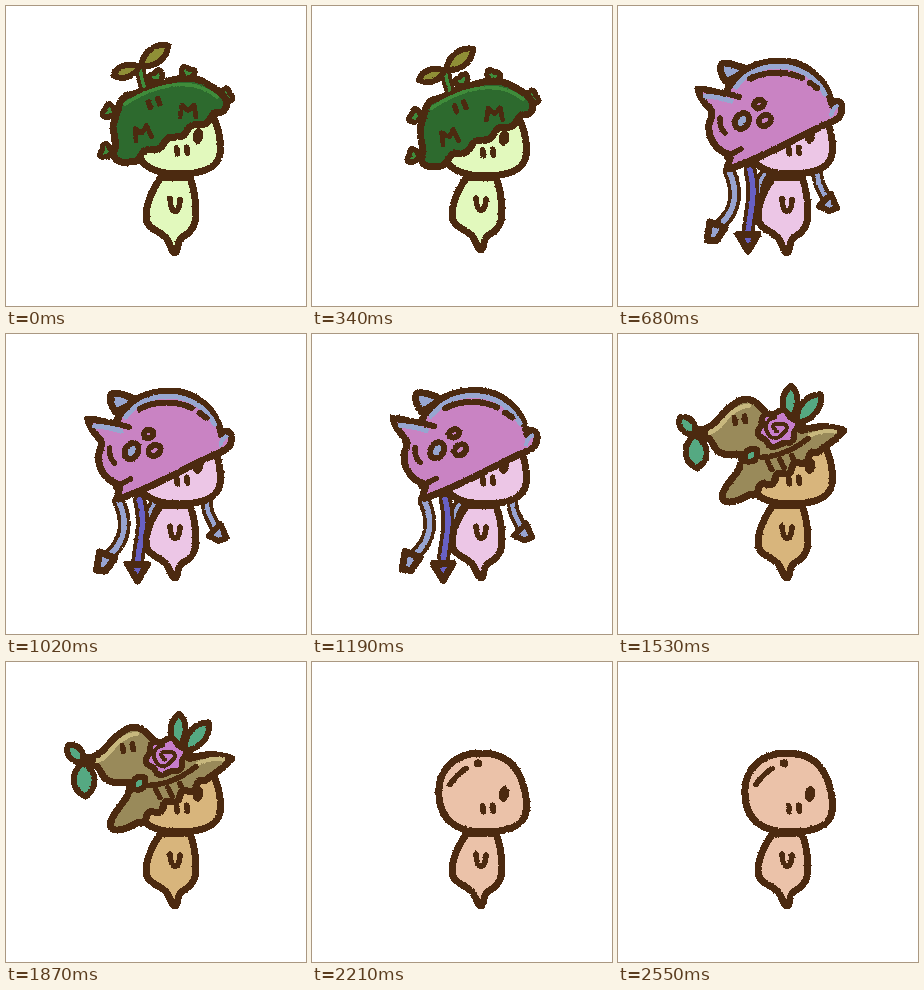
These frames come from a looping animation (300x300 px, 2720 ms). An HTML page:

```html
<!DOCTYPE html>
<html lang="en">
<head>
<meta charset="utf-8">
<title>Sprout hats</title>
<style>
html, body { margin: 0; width: 100%; height: 100%; overflow: hidden; background: #fff; }
svg { display: block; width: 100vw; height: 100vh; }
</style>
</head>
<body>
<svg viewBox="0 0 300 300" shape-rendering="crispEdges" stroke-linecap="round" stroke-linejoin="round">
  <filter id="rough" filterUnits="userSpaceOnUse" x="0" y="0" width="300" height="300" color-interpolation-filters="sRGB">
    <feTurbulence id="noise" type="fractalNoise" baseFrequency=".4" numOctaves="1" result="n"/>
    <feDisplacementMap in="SourceGraphic" in2="n" scale="2.4" xChannelSelector="R" yChannelSelector="G"/>
  </filter>
  <g id="stage" filter="url(#rough)"></g>
</svg>
<script>
const INK = '#4c2a10';
const STEP = 170, POSES = 4;

const group = (transform, ...parts) => `<g transform="${transform}">${parts.join('')}</g>`;
const path = (d, fill = 'none', w = 7, ink = INK) =>
  `<path d="${d}" fill="${fill}" stroke="${ink}" stroke-width="${w}"/>`;
const line = (d, w = 5.5, ink = INK) => path(d, 'none', w, ink);
const tube = (d, fill, w = 12) => line(d, w) + line(d, w - 7.5, fill);
const spot = (x, y, rx, ry, turn, fill = INK, w = 0) =>
  group(`translate(${x} ${y}) rotate(${turn})`,
    `<ellipse rx="${rx}" ry="${ry}" fill="${fill}" stroke="${INK}" stroke-width="${w}"/>`);

// Two short strokes side by side.
const pair = (x, y, turn = 0) =>
  group(`translate(${x} ${y}) rotate(${turn})`, line('M-5 -3V3M5 -3V3'));

// Letter-like crease on the cap.
const crease = (x, y, turn) =>
  group(`translate(${x} ${y}) rotate(${turn})`, line('M-8 7L-6 -5L0 1L6 -5L8 7', 4.8));

// Pointed leaf from base to tip, `fat` wide on each side.
function leaf(x, y, turn, length, fat, fill) {
  const a = length * .3, b = length * .75;
  return group(`translate(${x} ${y}) rotate(${turn})`,
    path(`M0 0C${a} ${-fat} ${b} ${-fat} ${length} 0C${b} ${fat} ${a} ${fat} 0 0Z`, fill, 6));
}

const bud = (x, y, turn, fill) =>
  group(`translate(${x} ${y}) rotate(${turn})`,
    path('M0 7C-9 3 -9 -7 0 -3C9 -7 9 3 0 7Z', fill, 5.5));

// Line commands for a scalloped edge.
function scallops(x1, y1, x2, y2, bumps, depth) {
  const n = bumps * 8, dx = x2 - x1, dy = y2 - y1, len = Math.hypot(dx, dy);
  let d = '';
  for (let i = 0; i <= n; i++) {
    const t = i / n, h = depth * Math.sin(t * bumps * Math.PI * 2);
    d += `L${x1 + dx * t - dy / len * h} ${y1 + dy * t + dx / len * h}`;
  }
  return d;
}

const torso = skin =>
  path('M155 171C146 184 140 198 140 209C140 222 154 222 161 231C165 238 166 244 169 244C172 244 171 234 175 230C184 225 190 219 190 207C190 192 188 182 184 171Z', skin) +
  line('M164 192C164 208 174 208 174 193');

const head = skin =>
  path('M127 133C125 108 143 91 169 91C192 91 206 103 212 125C218 152 217 170 171 170C145 170 128 158 127 133Z', skin) +
  spot(192, 132, 5.2, 8, 8) + pair(176, 146.5, -4);

function leafCap() {
  const dark = '#2d6a2e', mid = '#3f8b3a', olive = '#8f8f36';
  const cap = 'M123 156C112 158 105 152 109 143C112 134 104 126 109 113C113 102 113 91 123 89C138 87 144 77 157 77C170 72 184 70 196 75C206 81 214 84 219 92C222 98 221 103 216 106';
  return bud(150, 70, -35, mid) + bud(182, 66, 20, mid) + bud(221, 89, 60, mid) +
    bud(102, 105, -60, mid) + bud(99, 145, -70, mid) +
    path(cap + scallops(216, 106, 123, 156, 4, 2.5) + 'Z', dark) +
    line('M119 98C140 84 182 66 211 91', 3.5, mid) +
    tube('M134 62Q135 71 138 80', mid, 11) +
    leaf(133, 61, 162, 27, 8, olive) + leaf(135, 60, -37, 34, 10, olive) +
    pair(148, 97, -20) + crease(182, 104, 0) + crease(136, 126, -15);
}

function tentacles() {
  const pale = '#97a3d0', deep = '#6860c4';
  return tube('M148 166C136 182 141 192 139 206', pale, 11) +
    tube('M111 165C120 184 119 204 102 219', pale, 13) +
    path('M92 216L107 222L98 235L89 234Z', pale) +
    tube('M132 164C139 190 131 208 130 228', deep, 13) +
    path('M120 228L140 228L130 245Z', deep) +
    tube('M199 164C199 178 204 182 208 192', pale) +
    path('M201 200L213 188L219 202L211 205Z', pale, 6);
}

function helmet() {
  const pink = '#c983c3', blue = '#97a6d0';
  return path('M108 76C100 64 101 57 108 57C118 58 122 62 132 64Z', blue) +
    path('M111 163C106 158 117 152 110 148C97 144 90 131 91 119C92 112 96 110 93 104C87 98 82 92 80 83C90 83 100 88 108 87C118 62 143 55 163 55C187 55 209 72 214 99C218 92 224 96 224 102C224 112 218 114 211 117C178 131 150 150 111 163Z', pink) +
    line('M87 90Q101 91 113 95', 5, blue) + line('M108 87L121 91', 6) +
    line('M118 81C138 52 188 52 207 88', 5, blue) +
    line('M132 73C148 64 170 65 184 72M192 77L199 82', 6) +
    line('M219 100Q214 103 213 109', 4, blue) +
    line('M102 112Q101 121 107 127M108 151L123 143') +
    spot(124, 115, 6.5, 8.5, 30, blue, 6) +
    spot(141, 98, 5, 4, -20, pink, 6) + spot(147, 114.5, 6.5, 5, -35, pink, 6);
}

// Bloom with wavy petals and an inked swirl.
function bloom(x, y, fill) {
  let rim = '', swirl = '';
  for (let a = 0; a < 6.28; a += .1) {
    const r = 19 + 1.8 * Math.cos(a * 6);
    rim += `${rim ? 'L' : 'M'}${r * Math.cos(a)} ${r * .9 * Math.sin(a)}`;
  }
  for (let a = 2; a < 11; a += .2) {
    const r = a * 1.3 + Math.cos(a * 3);
    swirl += `${swirl ? 'L' : 'M'}${r * Math.cos(a)} ${r * .8 * Math.sin(a)}`;
  }
  return group(`translate(${x} ${y}) rotate(-15)`, path(rim + 'Z', fill, 6), line(swirl, 4));
}

function witchHat() {
  const felt = '#998a5a', pale = '#c8b87e', teal = '#55a982', rose = '#c77dcb';
  const crown = 'M80 96C98 97 101 79 117 70C129 61 138 67 147 78L184 97C198 92 213 92 226 97C217 108 208 112 199 119';
  const brim = 'C124 165 116 170 108 168C98 163 112 148 118 140C124 132 123 128 125 121C110 122 101 121 97 114C93 105 88 101 80 96Z';
  return leaf(77, 101, -130, 23, 9, teal) + leaf(77, 101, 86, 34, 14, teal) +
    leaf(171, 86, -86, 34, 10, teal) + leaf(179, 89, -50, 37, 11, teal) +
    path(crown + scallops(199, 119, 132, 161, 4, 3) + brim, felt) +
    line('M92 99C105 95 110 74 131 72', 4.5, pale) + line('M192 102Q204 96 217 98', 4, pale) +
    pair(122, 86, -10) +
    line('M128 122C150 128 174 118 190 105M150 128L154 136M162 126L166 134M174 122L177 130') +
    leaf(139, 116, 135, 16, 8, teal) + bloom(160, 95, rose);
}

const shine = () => line('M138 123Q144 114 154 107') + spot(166, 102, 4, 4, 0);

// rest: offset of the hat at the start of a cycle; swing: [x, y, turn] at mid cycle.
const looks = [
  { skin: '#e2f9bd', hat: leafCap, rest: [0, 0], swing: [0, 2, -1.3] },
  { skin: '#ecc6e6', hat: helmet, back: tentacles, rest: [0, 0], swing: [1.6, 2, 0] },
  { skin: '#d8b57c', hat: witchHat, rest: [1, -2], swing: [-1.6, 2.3, 0] },
  { skin: '#ebc2a9', hat: shine, rest: [0, -2], swing: [0, 2, 0] }
];

const stage = document.getElementById('stage');
const noise = document.getElementById('noise');

function draw(step) {
  const { skin, hat, back, rest, swing } = looks[Math.floor(step / POSES)];
  const pose = step % POSES;
  const phase = Math.sin(Math.PI * pose / POSES);
  const [x, y, turn] = swing.map(v => v * phase);
  const sway = `translate(${rest[0] + x} ${rest[1] + y}) rotate(${turn} 222 90)`;
  const lift = pose ? 0 : 1;
  noise.setAttribute('seed', step + 3);
  stage.innerHTML =
    group(sway, back ? back() : '') +
    group(`translate(0 171) scale(1 ${1 + .035 * lift}) translate(0 -171)`, torso(skin)) +
    group(`translate(0 ${-2 * lift})`, head(skin)) +
    group(sway, hat());
}

let shown = -1;
const start = performance.now();
function tick() {
  const step = Math.floor((performance.now() - start) / STEP) % (looks.length * POSES);
  if (step !== shown) draw(shown = step);
  requestAnimationFrame(tick);
}
tick();
</script>
</body>
</html>
```
